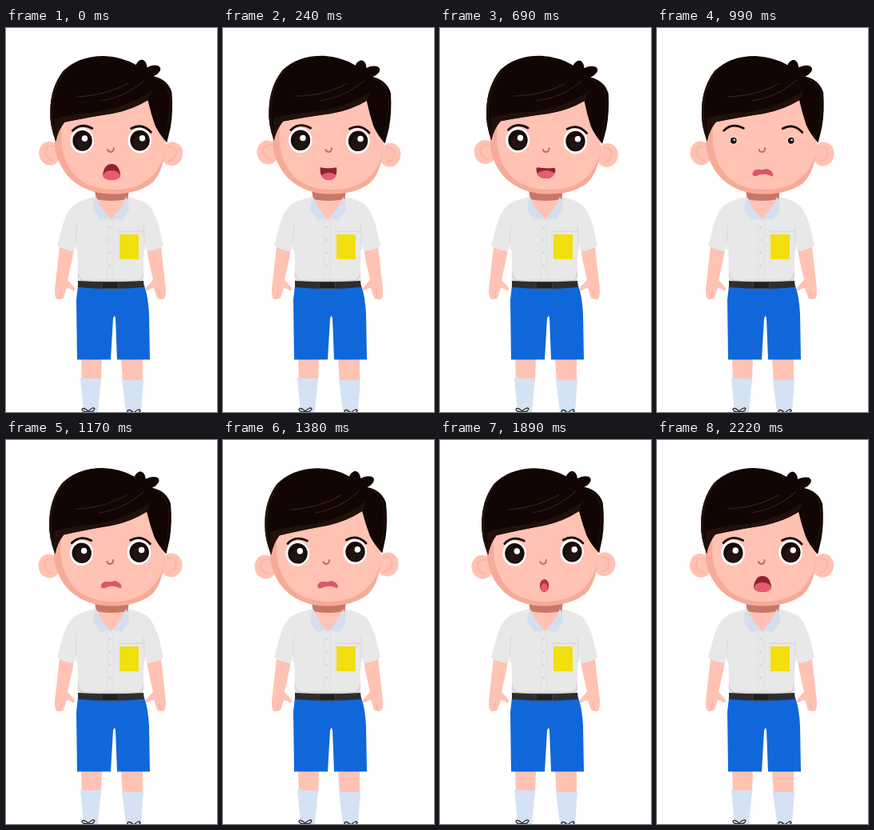
Animation, 264 px wide and 480 px high, one loop 2.25 s. Source, as an HTML page with a canvas:

```html
<!DOCTYPE html>
<html lang="en">
<head>
<meta charset="utf-8">
<style>
html, body { margin: 0; width: 100%; height: 100%; overflow: hidden; background: #fff; }
canvas { display: block; width: 264px; height: 480px; }
</style>
</head>
<body>
<canvas id="stage" width="264" height="480"></canvas>
<script>
const ctx = document.getElementById('stage').getContext('2d');
const LOOP = 2250, STEP = 30;
const SKIN = '#ffc2b3', SHADE = '#f6aa97', HAIR = '#120504', HAIR_EDGE = '#21110b', STRAND = '#39211d';
const SHIRT = '#e8e8e8', COLLAR = '#d5deee', BLUE = '#1067da', SOCK = '#d5e2f4';
const LIP = '#d95767', MOUTH = '#8f2432', TONGUE = '#e75d70';

function fill(d, color) {
  ctx.fillStyle = color;
  ctx.fill(new Path2D(d));
}

function line(d, color, width = 1) {
  ctx.strokeStyle = color;
  ctx.lineWidth = width;
  ctx.lineCap = ctx.lineJoin = 'round';
  ctx.stroke(new Path2D(d));
}

function oval(x, y, rx, ry, color, tilt = 0) {
  ctx.fillStyle = color;
  ctx.beginPath();
  ctx.ellipse(x, y, rx, ry, tilt, 0, Math.PI * 2);
  ctx.fill();
}

function mirrored(axis, draw) {
  draw();
  ctx.save();
  ctx.translate(2 * axis, 0);
  ctx.scale(-1, 1);
  draw();
  ctx.restore();
}

function clipped(d, draw) {
  ctx.save();
  ctx.clip(new Path2D(d));
  draw();
  ctx.restore();
}

function drawArm() {
  fill('M67 273 L62 318 Q60 330 62 337 Q65 341 68 338 Q72 340 73 334 L76 325 Q80 325 83 328 Q87 329 86 325 Q82 320 77 315 L83 288 L85 276 Z', SKIN);
  line('M67.5 338 L69.5 329', SHADE);
}

function drawLegs() {
  fill('M94 412 H120 L119 442 H95 Z M144 412 H171 L171 444 H146 Z', SKIN);
  fill('M93 437 Q106 439 119 437.5 L115 480 H97 Z', SOCK);
  fill('M145 439.5 Q158 441 172 439.5 L169 480 H150 Z', SOCK);
  const lace = 'M103 479 Q96 473 95 477 Q97 481 103 479 Q109 473 111 476 Q109 481 103 479';
  line(lace, '#2b2b2d', 1.3);
  ctx.save();
  ctx.translate(57, 2);
  line(lace, '#2b2b2d', 1.3);
  ctx.restore();
  fill('M90 322 H173 Q178 336 179 358 L180 414.5 H139 L137 363 Q136 357 134 363 L131 414.5 H89 L88 340 Z', BLUE);
}

function drawShirt() {
  const shape = 'M113 211 Q92 215 84 222 Q76 229 71 246 L64 272 Q73 278 85 279 L88 266 Q91 290 89.5 317 H172.5 Q171 290 173 266 L176 279 Q189 278 197 272 L191 246 Q185 229 179 222 Q171 215 152 211 Z';
  fill(shape, SHIRT);
  clipped(shape, () => line('M89 302 Q90 315 98 316 H164 Q172 315 173 302', '#d6d6d8', 2.5));
  mirrored(130.5, () => line('M89 246 Q87 257 88 277', '#d8d8da'));
  line('M126.5 239 V315 M134 239 V315', '#dcdddf', 0.8);
  for (const y of [249, 265, 281, 297]) oval(129.5, y, 1.7, 1.7, '#d2d9e4');
  line('M141 253 H172 V286 L157 292 L141 286 Z', '#dedfe3', 0.7);
  line('M141 254.5 H172', '#cfd7e5');
  ctx.fillStyle = '#f2df10';
  ctx.fillRect(142, 258, 24, 31);
}

function drawNeck() {
  fill('M112 200 H153 V216 L131 240 L112 216 Z', SKIN);
  fill('M111 203 H154 L152 214 Q131 218 113 214 Z', '#c77768');
  mirrored(131.5, () => fill('M113 211 Q109 218 109 228 L118 240 L131 238 Q119 227 113 211 Z', COLLAR));
}

function drawBody() {
  mirrored(130.5, drawArm);
  drawLegs();
  drawShirt();
  drawNeck();
  fill('M90 316 Q131 318.5 172 316 L173 324 Q131 328 90 324 Z', '#2e2e31');
  ctx.fillStyle = '#202023';
  ctx.fillRect(120, 317, 21, 9);
  line('M120.5 317.5 H140.5 V325.5 H120.5 Z', '#48484c', 0.8);
}

function drawEye(x, y, size) {
  ctx.save();
  ctx.translate(x, y);
  ctx.scale(size, size);
  oval(0, 0, 14.8, 15.8, '#fff');
  oval(0.3, 0, 12.2, 12.8, '#160c0b');
  oval(0.5, 2, 8.5, 9, '#231411');
  oval(3.2, -2.8, 3.7, 3.8, '#fff');
  ctx.restore();
}

function openMouth(shape, tongueY, tongueHeight, tongueWidth = 11) {
  fill(shape, MOUTH);
  clipped(shape, () => oval(132, tongueY, tongueWidth, tongueHeight, TONGUE));
}

const mouths = {
  gasp() {
    openMouth('M132 170 Q141 170 143 183 Q143 190 132 190 Q121 190 121 183 Q123 170 132 170 Z', 186, 8);
  },
  grin() {
    openMouth('M120.5 174.5 Q131 176 141 174 Q143 190 131 190 Q120 189 120.5 174.5 Z', 188, 7);
  },
  smile() {
    openMouth('M121 174.5 Q131 176 141 174.5 Q144 175 143 179 Q141 188 131 188 Q121 188 119.5 179 Q118.5 174 121 174.5 Z', 185, 7, 12);
  },
  frown() {
    fill('M119 182 Q121 176 128 177 Q132 178 136 176 Q143 177 145 183 Q145 187 140 184 Q132 181 124 185 Q119 186 119 182 Z', LIP);
  },
  round() {
    oval(131.5, 182, 5.7, 8, '#b53443');
    oval(131.5, 184.5, 4, 5, TONGUE);
  }
};

const speech = [[0, 'gasp'], [120, 'grin'], [450, 'smile'], [840, 'frown'], [1620, 'round'], [2070, 'gasp']];

function drawEars() {
  mirrored(131, () => {
    oval(54.5, 157, 13.5, 15, SKIN, -0.15);
    line('M59 148 Q48 147 49 157 Q51 165 59 166', '#f8b2a1', 1.4);
  });
}

function drawFace() {
  const face = 'M60.5 110 V145 Q63 172 82 190 Q102 207 130 207.5 Q164 208 183 193 Q198 178 199 145 V90 H60.5 Z';
  fill(face, SHADE);
  clipped(face, () => fill('M69 90 V143 Q72 173 92 190 Q109 202 134 202 Q163 202 179 188 Q194 176 200 150 V90 Z', SKIN));
  line('M127 152 Q127.5 155 131 155 Q135 154 134.5 150', '#b96d60', 1.9);
}

function drawHair() {
  const fringe = 'M62 142 Q65 128 73 118 Q101 112 133 107 Q158 102 177 90';
  const hair = fringe + ' Q181 107 186 121 Q191 132 201 143 L205.5 124 Q209 104 207 80 Q202 64 184 60 Q188 59 191 55 Q195 50 190 47 Q183 45 176 49 Q175 40 169 39.5 Q164 41 162 46 Q145 36 122 35 Q90 35 71 54 Q55 75 55 104 Q54 121 62 142 Z';
  fill(hair, HAIR);
  clipped(hair, () => {
    fill(fringe + ' L183 77 Q150 101 105 106 Q77 108 61 114 Z', HAIR_EDGE);
    line('M71 54 Q55 75 55 104 Q54 121 62 142', HAIR_EDGE, 6);
    line('M186 63 Q200 67 204 84 Q206 106 200 132', HAIR_EDGE, 1.2);
  });
  line('M88 86 Q123 85 152 69 M118 91 Q150 86 173 65', STRAND, 1.1);
}

function drawHead(t) {
  const sway = 0.029 * Math.sin((t + 40) / LOOP * Math.PI * 2);
  const blink = Math.max(0, 1 - Math.abs(t - 990) / 120);
  const eyeSize = 1 - 0.68 * blink * blink * (3 - 2 * blink);
  const mouth = speech.filter(([start]) => start <= t).pop()[1];

  ctx.save();
  ctx.translate(131, 225);
  ctx.rotate(sway);
  ctx.translate(-131, -225);
  drawEars();
  drawFace();
  drawEye(95, 141, eyeSize);
  drawEye(167, 140.5, eyeSize);
  line('M83 128.5 Q93 118 107.5 125.5', HAIR, 2.8);
  line('M156.5 125.5 Q170 118 181 130', HAIR, 2.8);
  mouths[mouth]();
  drawHair();
  ctx.restore();
}

function render(now) {
  const t = Math.floor((now % LOOP) / STEP) * STEP;
  ctx.fillStyle = '#fff';
  ctx.fillRect(0, 0, 264, 480);
  drawBody();
  drawHead(t);
}

let start;
function tick(now) {
  start ??= now;
  render(now - start);
  requestAnimationFrame(tick);
}
render(0);
requestAnimationFrame(tick);
</script>
</body>
</html>
```
